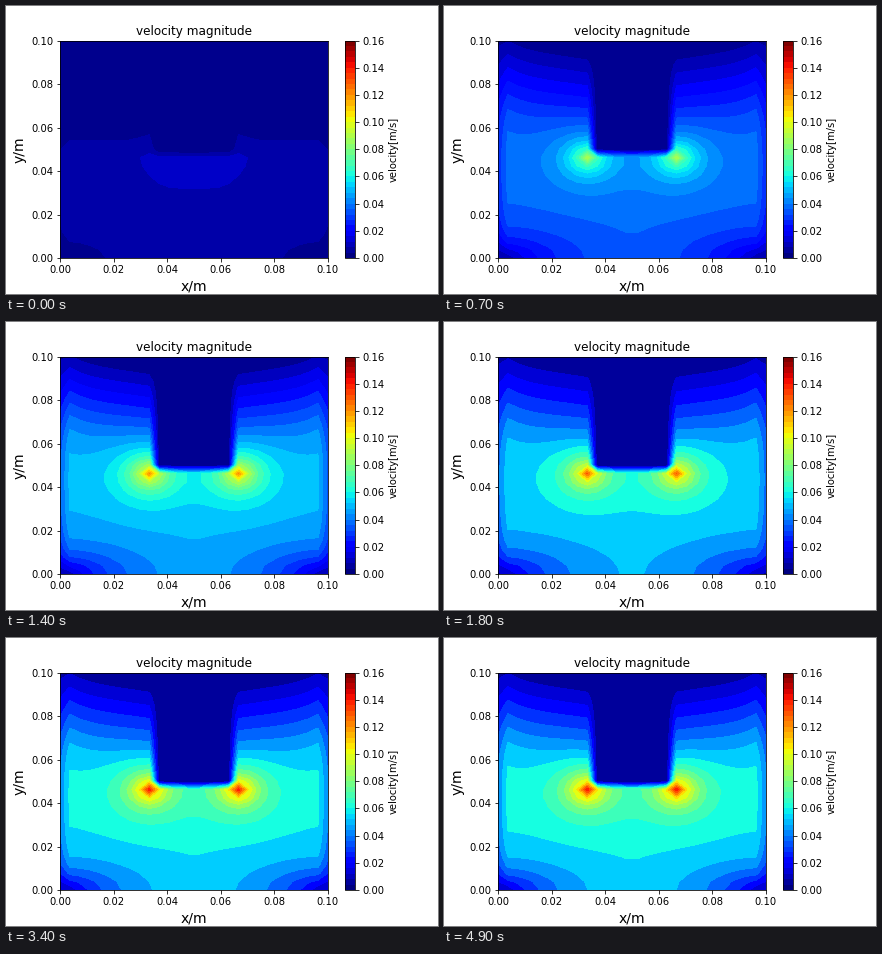
A matplotlib script that plays this animation: 432 by 288 pixels, repeating every 5000 ms.

```python
import numpy as np
import matplotlib.pyplot as plt
from matplotlib.animation import FuncAnimation
from matplotlib.cm import ScalarMappable
from matplotlib.colors import Normalize

FRAMES, INTERVAL = 50, 100
SIZE = 0.1                 # side of the square tank
NX, NY = 27, 26            # cells
BLOCK_X, BLOCK_Y = 10, 13  # first grid nodes inside the solid block
V_MAX = 0.16
SETTLE = 8.0               # time constant in frames

x = np.linspace(0, SIZE, NX + 1)
y = np.linspace(0, SIZE, NY + 1)
X, Y = np.meshgrid(x, y)
SIDE = np.minimum(X, SIZE - X)  # distance to the nearer side wall
EDGE_X, EDGE_Y = x[BLOCK_X - 1], y[BLOCK_Y - 1]


def soft_min(a, b, p=8):
    return (a ** -p + b ** -p) ** (-1 / p)


def base_flow():
    """Speed rises out of the bottom corners and fades up the side channels."""
    corner = np.hypot(SIDE, 2.2 * Y)
    lower = 0.0585 * (1 - np.exp(-corner / 0.0195))
    channel = np.minimum(SIDE / EDGE_X, 1)
    upper = 1.3 * (SIZE - Y) + 0.012 * np.exp(-SIDE / 0.008) - 0.004 * channel ** 2
    return soft_min(np.maximum(lower, 1e-4), np.maximum(upper, 1e-4))


def edge_peak(cx):
    return 0.086 * np.exp(-np.hypot(X - cx, Y - EDGE_Y) / 0.0065)


BASE = base_flow()
PEAKS = edge_peak(EDGE_X) + edge_peak(SIZE - EDGE_X)
ABOVE = np.clip((Y - EDGE_Y) / 0.01, 0, 1)
BOWL = np.exp(-((X - SIZE / 2) / 0.018) ** 4 - ((Y - EDGE_Y) / 0.018) ** 2)


def speed_field(n):
    early = np.exp(-n / 1.5)
    growth = 1 - np.exp(-(n + 1) / SETTLE)
    v = growth * (BASE + PEAKS * (1 - 0.85 * early)) * (1 - 0.5 * early * ABOVE)
    v += 0.0021 * early * BOWL
    v[:, 0] = 0.7 * v[:, 1]
    v[:, -1] = 0.7 * v[:, -2]
    v[BLOCK_Y:, BLOCK_X:NX - BLOCK_X + 1] = 0
    return v


def band_levels(peak):
    """Round steps that give about twenty bands."""
    step = next((s for s in (0.004, 0.005, 0.006) if peak <= 21 * s), 0.008)
    return step * np.arange(int(peak / step) + 2)


plt.rcParams["font.family"] = "DejaVu Sans"
fig, ax = plt.subplots(figsize=(6, 4), dpi=72, facecolor="white")
fig.subplots_adjust(left=0.125, right=0.9, bottom=0.125, top=0.88)
norm = Normalize(0, V_MAX)
bar = fig.colorbar(ScalarMappable(norm, plt.get_cmap("jet", 40)), ax=ax,
                   ticks=np.linspace(0, V_MAX, 9), format="%.2f")
bar.set_label("velocity[m/s]", fontsize=10)
ax.set_title("velocity magnitude", fontsize=12)
ax.set_xlabel("x/m", fontsize=14)
ax.set_ylabel("y/m", fontsize=14)
ax.set(xlim=(0, SIZE), ylim=(0, SIZE))

bands = []


def draw(n):
    while bands:
        bands.pop().remove()
    v = speed_field(n)
    bands.append(ax.contourf(X, Y, v, levels=band_levels(v.max()),
                             cmap="jet", norm=norm))
    return bands


anim = FuncAnimation(fig, draw, frames=FRAMES, init_func=lambda: draw(0),
                     interval=INTERVAL, repeat=True, repeat_delay=0, blit=False)
plt.show()
```
